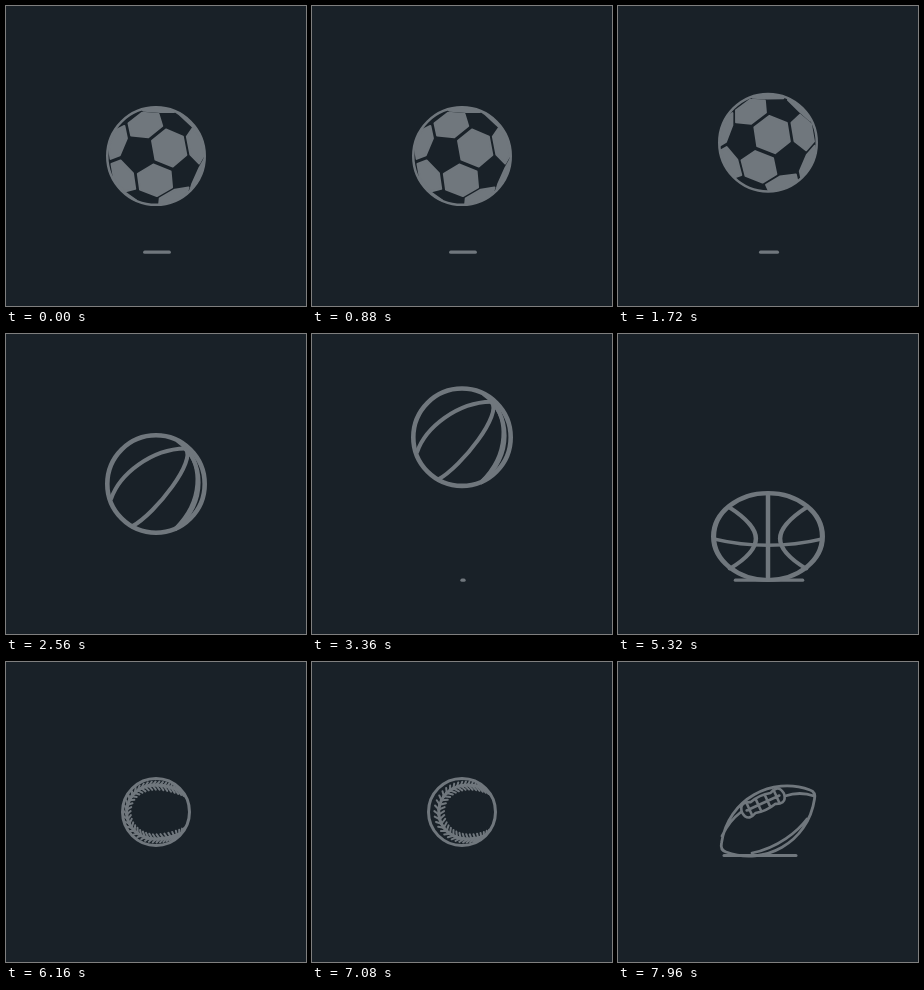
Animation of 300 by 300 pixels, one loop 8 s. Source, as an HTML page with a canvas:

```html
<!DOCTYPE html>
<html lang="en">
<head>
<meta charset="utf-8">
<title>Bouncing balls</title>
<style>
html, body { margin: 0; width: 100%; height: 100%; overflow: hidden; background: #192128; }
canvas { display: block; width: 300px; height: 300px; }
</style>
</head>
<body>
<canvas id="stage"></canvas>
<script>
const INK = '#70777d', NIGHT = '#192128', LOOP = 8000, TAU = Math.PI * 2, GROUND = 248;
const canvas = document.getElementById('stage'), ctx = canvas.getContext('2d');
const ratio = window.devicePixelRatio || 1;
canvas.width = canvas.height = 300 * ratio;

const clamp = v => Math.min(1, Math.max(0, v));
const smooth = v => { v = clamp(v); return v * v * (3 - 2 * v); };
const easeOut = v => 1 - (1 - clamp(v)) ** 2;
const mix = (a, b, k) => a + (b - a) * k;
const dot = (a, b) => a[0] * b[0] + a[1] * b[1] + a[2] * b[2];
const add = (a, b, k = 1) => a.map((v, i) => v + b[i] * k);
const unit = a => { const l = Math.hypot(...a); return a.map(v => v / l); };
const cross = (a, b) => [a[1]*b[2] - a[2]*b[1], a[2]*b[0] - a[0]*b[2], a[0]*b[1] - a[1]*b[0]];
const spinY = ([x, y, z], a) =>
  [x * Math.cos(a) + z * Math.sin(a), y, z * Math.cos(a) - x * Math.sin(a)];

// Hexagons of a truncated icosahedron, posed by one pentagon and one hexagon direction.
function makeHexagons(pentagon, hexagon) {
  const e1 = unit(pentagon), e2 = unit(add(hexagon, e1, -dot(hexagon, e1))), e3 = cross(e1, e2);
  const vertices = [e1, e1.map(v => -v)];
  for (let i = 0; i < 10; i++) {
    const lon = i * TAU / 10, h = (i % 2 ? 1 : -1) / Math.sqrt(5), r = 2 / Math.sqrt(5);
    vertices.push(add(add(e1.map(v => v * h), e2, r * Math.cos(lon)), e3, r * Math.sin(lon)));
  }
  const near = (a, b) => dot(a, b) > 0.4, faces = [];
  vertices.forEach((a, i) => vertices.forEach((b, j) => vertices.forEach((c, k) => {
    if (i < j && j < k && near(a, b) && near(b, c) && near(a, c)) {
      const center = unit(add(add(a, b), c));
      const corners = [[a, b], [b, a], [b, c], [c, b], [c, a], [a, c]].map(([p, q]) =>
        unit(add(center.map(v => v * 0.14), unit(add(p.map(v => v * 2), q)), 0.86)));
      faces.push({ center, corners });
    }
  })));
  return faces;
}
const hexagons = makeHexagons([-0.37, -0.045, 0.928], [0.25, -0.16, 0.955]);

function ring(r, width) {
  ctx.lineWidth = width;
  ctx.beginPath();
  ctx.arc(0, 0, r - width / 2, 0, TAU);
  ctx.stroke();
}

// Perspective view of a unit sphere; points past the limb slide onto it.
function project([x, y, z], radius, distance = 8) {
  const k = z < 1 / distance
    ? radius / Math.hypot(x, y)
    : radius * Math.sqrt(distance ** 2 - 1) / (distance - z);
  return [x * k, y * k];
}

function drawSoccer(spin) {
  ctx.lineWidth = 2;
  for (const { center, corners } of hexagons) {
    if (spinY(center, spin)[2] < -0.1) continue;
    ctx.beginPath();
    for (const corner of corners) ctx.lineTo(...project(spinY(corner, spin), 48.5));
    ctx.closePath();
    ctx.fill();
    ctx.stroke();
  }
  ring(50, 2.5);
}

// Each seam is one cubic curve: facing the viewer, and turned in the air.
const seams = [
  [[0, -1, 0, -0.33, 0, 0.33, 0, 1], [0.45, -0.88, 1, -0.5, 1.05, 0.4, 0.4, 0.92]],
  [[0.98, 0.06, 0.35, 0.25, -0.35, 0.25, -0.98, 0.06], [0.6, -0.73, 0.85, -0.5, 0, 0.6, -0.49, 0.87]],
  [[-0.7, 0.74, -0.06, 0.25, -0.06, -0.15, -0.72, -0.68], [-0.92, 0.3, -0.75, -0.2, -0.1, -0.72, 0.6, -0.73]],
  [[0.72, -0.68, 0.06, -0.15, 0.06, 0.25, 0.7, 0.74], [0.6, -0.73, 0.95, -0.4, 0.98, 0.35, 0.4, 0.92]]
];

function drawBasketball(turn) {
  ring(51, 4.6);
  ctx.lineWidth = 4;
  for (const [front, turned] of seams) {
    const p = front.map((v, i) => mix(v, turned[i], turn) * 48.7);
    ctx.beginPath();
    ctx.moveTo(p[0], p[1]);
    ctx.bezierCurveTo(...p.slice(2));
    ctx.stroke();
  }
}

function seamPoint(a) {
  const x = 0.75 * Math.cos(a) + 0.25 * Math.cos(3 * a);
  const y = 0.75 * Math.sin(a) - 0.25 * Math.sin(3 * a);
  return unit([-0.866 * Math.sin(2 * a), 1.3 * (x - y) / Math.SQRT2, (x + y) / Math.SQRT2]);
}

function drawBaseball(radius, spin) {
  ctx.save();
  ctx.scale(radius / 35, radius / 35);
  ring(35, 3);
  ctx.beginPath();
  ctx.arc(0, 0, 33, 0, TAU);
  ctx.clip();
  const steps = 84;
  const line = (a, b, width) => {
    a = spinY(a, spin);
    b = spinY(b, spin);
    if (a[2] < -0.05) return;
    ctx.lineWidth = width;
    ctx.beginPath();
    ctx.moveTo(a[0] * 34, a[1] * 34);
    ctx.lineTo(b[0] * 34, b[1] * 34);
    ctx.stroke();
  };
  for (let i = 0; i < steps; i++) {
    const a = i / steps * TAU, p = seamPoint(a), next = seamPoint(a + TAU / steps);
    const along = unit(add(next, p, -1)), side = cross(p, along);
    line(p, next, 3);
    for (const s of [-0.2, 0.2]) line(p, unit(add(add(p, side, s), along, 0.1)), 2);
  }
  ctx.restore();
}

function drawFootball() {
  ctx.lineWidth = 2.8;
  ctx.beginPath();
  ctx.moveTo(-46.5, 22);
  ctx.bezierCurveTo(-40, -22, 4, -45, 42, -31);
  ctx.quadraticCurveTo(48, -29, 46.5, -22);
  ctx.bezierCurveTo(40, 22, -4, 45, -42, 31);
  ctx.quadraticCurveTo(-48, 29, -46.5, 22);
  ctx.closePath();
  ctx.moveTo(-16, 32);
  ctx.bezierCurveTo(10, 27, 30, 10, 39, -2);
  ctx.moveTo(-46, 15);
  ctx.quadraticCurveTo(-39, 0, -27, -9);
  ctx.moveTo(17, -25);
  ctx.quadraticCurveTo(32, -30, 46, -25);
  ctx.stroke();

  ctx.save();
  ctx.translate(-5, -18);
  ctx.rotate(-0.43);
  ctx.lineWidth = 2.6;
  ctx.beginPath();
  ctx.moveTo(-23, 0);
  ctx.bezierCurveTo(-22, -10, -15, -8, -11, -6);
  ctx.quadraticCurveTo(0, -9, 11, -6);
  ctx.bezierCurveTo(15, -8, 22, -10, 23, 0);
  ctx.bezierCurveTo(22, 10, 15, 8, 11, 6);
  ctx.quadraticCurveTo(0, 9, -11, 6);
  ctx.bezierCurveTo(-15, 8, -22, 10, -23, 0);
  ctx.closePath();
  ctx.fillStyle = NIGHT;
  ctx.fill();
  ctx.moveTo(-18, 0);
  ctx.lineTo(18, 0);
  for (const x of [-15, -5, 5, 15]) {
    ctx.moveTo(x, -6);
    ctx.lineTo(x, 6);
  }
  ctx.stroke();
  ctx.restore();
}

function drawShadow(width, x = 151, y = 246.2, weight = 3.3) {
  if (width < 0.3) return;
  const half = Math.max(0, width - weight) / 2;
  ctx.lineWidth = Math.min(weight, width);
  ctx.beginPath();
  ctx.moveTo(x - half, y);
  ctx.lineTo(x + half + 0.01, y);
  ctx.stroke();
}

// Phase runs from -PI to PI: apex at 0, deepest squash at the ends.
function bounce(t, { apexTime, period, top, radius, contact, wide, flat }) {
  const cycle = (t - apexTime) / period, n = cycle - Math.round(cycle), u = Math.abs(n) * 2;
  const squash = u > contact ? Math.sin((u - contact) / (1 - contact) * Math.PI / 2) : 0;
  const sx = 1 + wide * squash, sy = 1 - flat * squash;
  const y = squash ? GROUND - radius * sy : mix(top, GROUND - radius, (u / contact) ** 2);
  return { phase: n * TAU, y, sx, sy, shadow: 5 + 74 * u ** 2.8 };
}

const soccer = { apexTime: -288, period: 880, top: 98, radius: 50, contact: 0.91, wide: 0.1, flat: 0.1 };
const basket = { apexTime: 3304, period: 800, top: 100.5, radius: 51, contact: 0.85, wide: 0.13, flat: 0.12 };

function at(y, sx, sy, draw) {
  ctx.save();
  ctx.translate(150, y);
  ctx.scale(sx, sy);
  draw();
  ctx.restore();
}

function render(t) {
  ctx.setTransform(ratio, 0, 0, ratio, 0, 0);
  ctx.fillStyle = NIGHT;
  ctx.fillRect(0, 0, 300, 300);
  ctx.fillStyle = ctx.strokeStyle = INK;
  ctx.lineCap = ctx.lineJoin = 'round';

  if (t < 1780) {
    const b = bounce(t, soccer), angle = p => p + Math.sin(p);
    drawShadow(b.shadow);
    at(b.y, b.sx, b.sy, () => drawSoccer(angle(b.phase) - angle(TAU * 288 / 880)));
  } else if (t < 5960) {
    const b = bounce(t, basket), turn = smooth(0.5 + 0.9 * Math.cos(b.phase));
    if (t < basket.apexTime) {
      const rise = easeOut((t - 2960) / (basket.apexTime - 2960));
      drawShadow(26 * (1 - easeOut((t - 1760) / 240)) + 5 * rise);
      at(mix(150, basket.top, rise), 1, 1, () => drawBasketball(turn));
    } else {
      drawShadow(b.shadow);
      at(b.y, b.sx, b.sy, () => drawBasketball(turn));
    }
  } else if (t < 7580) {
    drawShadow(24 * (1 - easeOut((t - 5960) / 160)));
    at(150, 1, 1, () => drawBaseball(mix(50, 35, easeOut((t - 5960) / 160)), (t - 6160) / 880 * TAU));
  } else {
    const drop = ((t - 7750) / 210) ** 2;
    drawShadow(5 + 70 * Math.min(1, drop) ** 1.4, 142, 193.5, 3);
    at(121 + 38 * Math.min(drop, 1), 1, 1, drawFootball);
  }
}

function frame() {
  render(performance.now() % LOOP);
  requestAnimationFrame(frame);
}
frame();
</script>
</body>
</html>
```
